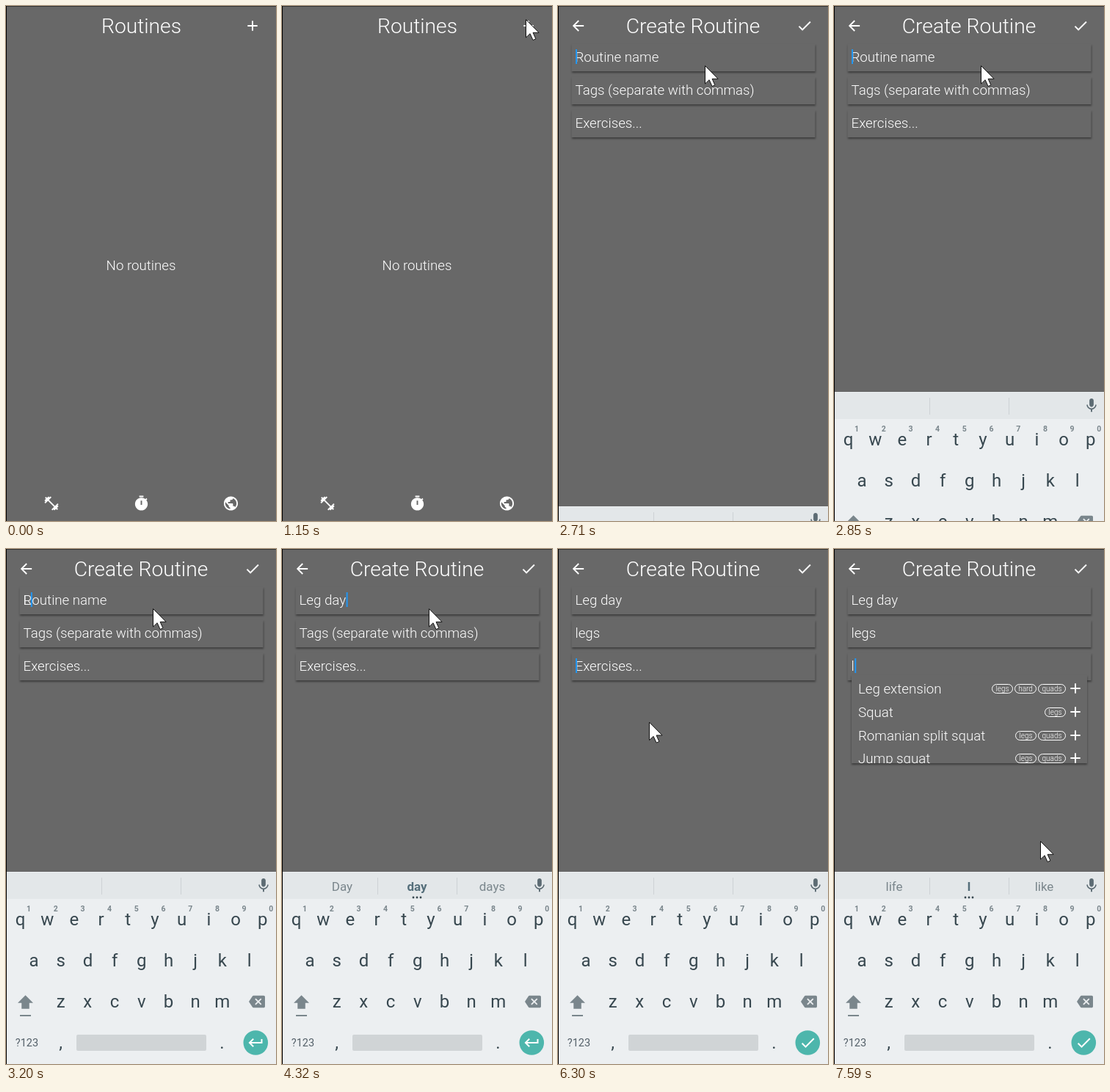
Recreate the animation shown at these times as an HTML page with a canvas. Size 368 by 702 pixels, loop 8 s.

```html
<!DOCTYPE html>
<html lang="en">
<head>
<meta charset="utf-8">
<title>Create Routine</title>
<style>
  html, body { margin: 0; width: 100%; height: 100%; overflow: hidden; background: #686868; }
  canvas { display: block; }
</style>
</head>
<body>
<canvas id="stage" width="368" height="702"></canvas>
<script>
const ctx = document.getElementById('stage').getContext('2d');
const W = 368, H = 702, LOOP = 8000;
const GREY = '#686868', INK = '#37474f', MUTED = '#7a868c';
const BODY = '300 18.7px', TITLE = '300 28.2px';

const icons = {
  add: 'M19 13h-6v6h-2v-6H5v-2h6V5h2v6h6v2z',
  back: 'M20 11H7.83l5.59-5.59L12 4l-8 8 8 8 1.41-1.41L7.83 13H20v-2z',
  check: 'M9 16.17L4.83 12l-1.42 1.41L9 19 21 7l-1.41-1.41z',
  enter: 'M19 7v4H5.83l3.58-3.59L8 6l-6 6 6 6 1.41-1.41L5.83 13H21V7z',
  weights: 'M20.57 14.86L22 13.43 20.57 12 17 15.57 8.43 7 12 3.43 10.57 2 9.14 3.43 7.71 2 5.57 4.14 4.14 2.71 2.71 4.14l1.43 1.43L2 7.71l1.43 1.43L2 10.57 3.43 12 7 8.43 15.57 17 12 20.57 13.43 22l1.43-1.43L16.29 22l2.14-2.14 1.43 1.43 1.43-1.43-1.43-1.43L22 16.29z',
  timer: 'M15 1H9v2h6V1zm4.03 6.39l1.42-1.42c-.43-.51-.9-.99-1.41-1.41l-1.42 1.42C16.07 4.74 14.12 4 12 4c-4.97 0-9 4.03-9 9s4.02 9 9 9 9-4.03 9-9c0-2.12-.74-4.07-1.97-5.61zM13 14h-2V8h2v6z',
  globe: 'M12 2C6.48 2 2 6.48 2 12s4.48 10 10 10 10-4.48 10-10S17.52 2 12 2zm-1 17.93c-3.95-.49-7-3.85-7-7.93 0-.62.08-1.21.21-1.79L9 15v1c0 1.1.9 2 2 2v1.93zm6.9-2.54c-.26-.81-1-1.39-1.9-1.39h-1v-3c0-.55-.45-1-1-1H8v-2h2c.55 0 1-.45 1-1V7h2c1.1 0 2-.9 2-2v-.41c2.93 1.19 5 4.06 5 7.41 0 2.08-.8 3.97-2.1 5.39z',
  mic: 'M12 14c1.66 0 2.99-1.34 2.99-3L15 5c0-1.66-1.34-3-3-3S9 3.34 9 5v6c0 1.66 1.34 3 3 3zm5.3-3c0 3-2.54 5.1-5.3 5.1S6.7 14 6.7 11H5c0 3.41 2.72 6.23 6 6.72V21h2v-3.28c3.28-.48 6-3.3 6-6.72h-1.7z',
  erase: 'M22 3H7c-.69 0-1.23.35-1.59.88L0 12l5.41 8.11c.36.53.9.89 1.59.89h15c1.1 0 2-.9 2-2V5c0-1.1-.9-2-2-2zm-3 12.59L17.59 17 14 13.41 10.41 17 9 15.59 12.59 12 9 8.41 10.41 7 14 10.59 17.59 7 19 8.41 15.41 12 19 15.59z',
  shift: 'M12 2L0 14h6v9h12v-9h6z',
  arrow: 'M0 0V24.5L5.6 19.2L9.6 28L13.4 26.3L9.6 17.8H17.6Z'
};
for (const name in icons) icons[name] = new Path2D(icons[name]);

const fields = [
  { hint: 'Routine name', text: 'Leg day', focus: 2310, keys: [3200, 3270, 3400, 3600, 3660, 3760, 3860] },
  { hint: 'Tags (separate with commas)', text: 'legs', focus: 4690, keys: [4930, 5050, 5160, 5280] },
  { hint: 'Exercises...', text: 'l', focus: 5960, keys: [7450] }
];
const suggestions = [
  [0], [3760, 'Day', 'day', 'days'], [4690], [5000, 'life', 'I', 'like'],
  [5210, 'leg', 'legs', 'legit'], [5960], [7520, 'life', 'I', 'like']
];
const exercises = [
  ['Leg extension', 'quads', 'hard', 'legs'], ['Squat', 'legs'],
  ['Romanian split squat', 'quads', 'legs'], ['Jump squat', 'quads', 'legs']
];
// Pointer stops as [time, x, y]; a stop without a position hides it.
const pointer = [
  [0], [70, 359, 589], [130], [540, 346, 50], [950, 332, 18], [1150, 332, 18], [1280, 331, 18],
  [1920, 331, 18], [2240, 200, 81], [4320, 200, 81], [4620, 181, 103], [5610, 181, 103],
  [5900, 128, 156], [5970, 128, 156], [6100, 124, 234], [6300, 124, 234], [6580, 122, 702],
  [6590], [7040, 281, 575], [7180, 281, 398], [LOOP, 281, 398]
];

const progress = (t, from, to) => Math.min(1, Math.max(0, (t - from) / (to - from)));
const smooth = u => u * u * (3 - 2 * u);
const latest = (list, t) => list.findLastIndex(item => item[0] <= t);

function text(str, x, y, font, color = '#fff', align = 'left') {
  ctx.font = font + ' Roboto, sans-serif';
  ctx.fillStyle = color;
  ctx.textAlign = align;
  ctx.fillText(str, x, y);
}

function rect(x, y, w, h, color) {
  ctx.fillStyle = color;
  ctx.fillRect(x, y, w, h);
}

function disc(x, y, r, color) {
  ctx.fillStyle = color;
  ctx.beginPath();
  ctx.arc(x, y, r, 0, 7);
  ctx.fill();
}

function icon(name, x, y, size = 23, color = '#fff') {
  ctx.save();
  ctx.translate(x - size / 2, y - size / 2);
  ctx.scale(size / 24, size / 24);
  ctx.fillStyle = color;
  ctx.fill(icons[name]);
  ctx.restore();
}

function card(x, y, w, h) {
  ctx.save();
  ctx.shadowColor = 'rgba(0,0,0,.42)';
  ctx.shadowBlur = 2.5;
  ctx.shadowOffsetY = 1.7;
  rect(x, y, w, h, GREY);
  ctx.restore();
}

function drawHome(t) {
  rect(0, 0, W, H, GREY);
  text('Routines', 184.5, 37, TITLE, '#fff', 'center');
  icon('add', 336, 27);
  text('No routines', 184, 360, BODY, '#fff', 'center');
  icon('weights', 62, 678);
  icon('timer', 184.5, 678);
  icon('globe', 306.5, 678);
  const ripple = progress(t, 1480, 1740);
  if (ripple) disc(336, 27, 33 * ripple, 'rgba(255,255,255,.15)');
}

function drawField(field, i, t, focused) {
  const y = 45 * i, started = field.keys[0];
  const typed = field.text.slice(0, field.keys.filter(k => k <= t).length);
  card(18.5, 52 + y, 332, 37);
  const alpha = ctx.globalAlpha;
  ctx.globalAlpha = alpha * (1 - progress(t, started, started + 140));
  text(field.hint, 23.5, 75.7 + y, BODY);
  ctx.globalAlpha = alpha;
  text(typed, 23.5, 75.7 + y, BODY);
  const blinkedOff = t >= 6560 && t < 7040;
  if (focused && !blinkedOff) {
    rect(24 + ctx.measureText(typed).width, 59 + y, 2, 20, '#2196f3');
  }
}

function drawResults() {
  card(24, 172, 321, 120);
  ctx.save();
  ctx.beginPath();
  ctx.rect(24, 172, 321, 120);
  ctx.clip();
  ctx.strokeStyle = '#fff';
  ctx.lineWidth = 1;
  exercises.forEach(([name, ...tags], i) => {
    const y = Math.round(190 + 31.8 * i);
    text(name, 33, y + 6.7, BODY);
    icon('add', 329, y);
    let right = 316;
    for (const tag of tags) {
      ctx.font = '300 10px Roboto, sans-serif';
      const w = Math.round(ctx.measureText(tag).width + 10.5);
      ctx.beginPath();
      ctx.roundRect(right - w + .5, y - 5.5, w - 1, 12, 6);
      ctx.stroke();
      text(tag, right - w / 2, y + 3.5, '300 10px', '#fff', 'center');
      right -= w + 2;
    }
  });
  ctx.restore();
}

function drawForm(t) {
  const enter = 1 - (1 - progress(t, 1755, 2195)) ** 3;
  const scale = .85 + .15 * enter;
  ctx.save();
  ctx.globalAlpha = progress(t, 1755, 1860);
  ctx.translate(184, 323);
  ctx.scale(scale, scale);
  ctx.translate(-184, -323);
  rect(0, -60, W, 766, GREY);
  const active = fields.findLastIndex(f => f.focus <= t);
  fields.forEach((field, i) => drawField(field, i, t, i === active));
  icon('back', 27.5, 27);
  text('Create Routine', 184, 37, TITLE, '#fff', 'center');
  icon('check', 336, 27);
  ctx.restore();
  if (t >= 7520) drawResults();
}

function drawKeyboard(t) {
  const slide = 1 - smooth(progress(t, 2659, 2970));
  if (slide === 1) return;
  ctx.save();
  ctx.translate(0, Math.round(262 * slide));
  rect(0, 440, W, 262, '#eceff1');
  rect(0, 441, W, 36, '#e3e7e9');
  rect(130, 448, 1, 23, '#cdd2d5');
  rect(238, 448, 1, 23, '#cdd2d5');
  icon('mic', 351, 458.5, 23, '#5c6b73');

  const [, left, middle, right] = suggestions[latest(suggestions, t)];
  if (middle) {
    text(left, 82, 466, '17px', MUTED, 'center');
    text(middle, 184, 466, 'bold 17px', '#546e7a', 'center');
    text(right, 286.5, 466, '17px', MUTED, 'center');
    for (const x of [179, 184, 189]) disc(x, 475, 1.4, INK);
  }

  const row = (letters, x, y) => [...letters].forEach((letter, i) =>
    text(letter, x + 36.7 * i, y, '24px', INK, 'center'));
  row('qwertyuiop', 19.5, 513);
  row('asdfghjkl', 38, 569);
  row('zxcvbnm', 74.6, 625);
  [...'1234567890'].forEach((digit, i) =>
    text(digit, 31 + 36.7 * i, 493.5, 'bold 10.5px', MUTED, 'center'));

  icon('shift', 26.5, 617, 21, MUTED);
  rect(19, 635, 15, 2, MUTED);
  icon('erase', 342, 617, 22, MUTED);
  text('?123', 28.5, 678, '14.5px', '#546069', 'center');
  text(',', 74.5, 681, '24px', INK, 'center');
  text('.', 294.5, 681, '24px', INK, 'center');
  ctx.fillStyle = '#d0d4d6';
  ctx.beginPath();
  ctx.roundRect(96, 662, 177, 22, 2);
  ctx.fill();
  disc(340.3, 673, 16.8, '#4db6ac');
  icon(t < 5980 ? 'enter' : 'check', 340.5, 673, 24);
  ctx.restore();
}

function drawPointer(t) {
  const i = latest(pointer, t);
  const [t0, x, y] = pointer[i];
  if (x === undefined) return;
  const [t1, x1 = x, y1 = y] = pointer[i + 1];
  const u = progress(t, t0, t1);
  ctx.save();
  ctx.translate(x + (x1 - x) * u + .5, y + (y1 - y) * u + .5);
  ctx.fillStyle = '#fff';
  ctx.strokeStyle = '#111';
  ctx.lineWidth = 1;
  ctx.fill(icons.arrow);
  ctx.stroke(icons.arrow);
  ctx.restore();
}

function draw() {
  const t = performance.now() % LOOP;
  drawHome(t);
  rect(0, 0, W, H, `rgba(0,0,0,${.24 * progress(t, 1755, 1880)})`);
  if (t > 1755) drawForm(t);
  drawKeyboard(t);
  rect(0, 0, W, 1, '#333');
  rect(0, 0, 1, H, '#000');
  drawPointer(t);
  requestAnimationFrame(draw);
}
draw();
</script>
</body>
</html>
```
